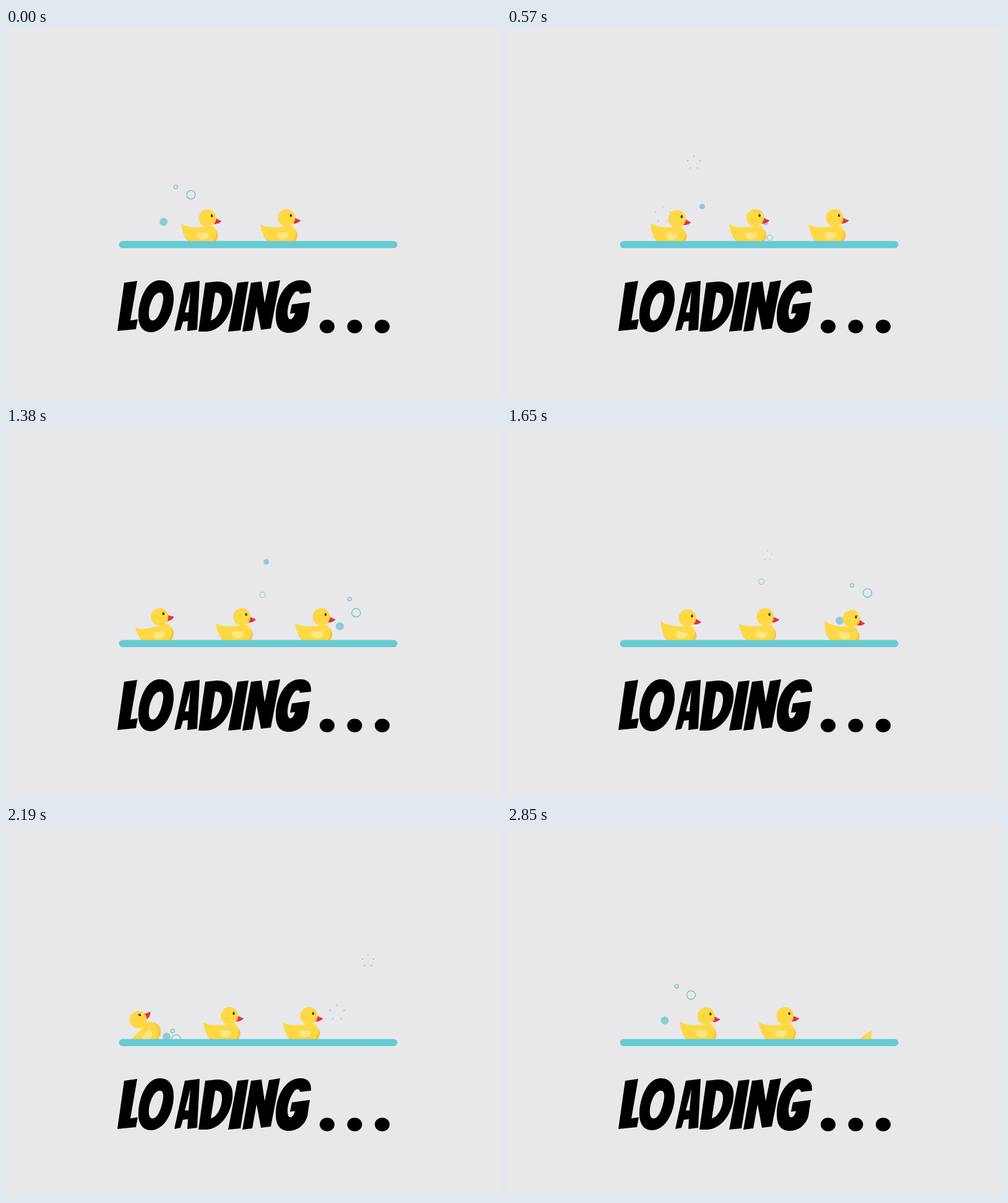
Recreate the animation shown at these times as an HTML page with a canvas. Size 800 by 600 pixels, loop 2.88 s.

```html
<!DOCTYPE html>
<html lang="en">
<head>
<meta charset="utf-8">
<title>Loading...</title>
<style>
html, body { margin: 0; width: 100%; height: 100%; overflow: hidden; background: #e8e8ea; }
canvas { display: block; }
</style>
</head>
<body>
<canvas id="stage" width="800" height="600" role="img" aria-label="Loading..."></canvas>
<script>
const ctx = document.getElementById('stage').getContext('2d');
const LOOP = 2880, STEP = 30, WATER = 345, BURST = 300;
const BACK = '#e8e8ea', BAR = '#66cbd2', RING = '#7cc8cf', SOLID = '#8fccd4', YELLOW = '#ffd842';

const letters = [
  'M191 412L212 409L201 473L213 471L210 487L180 490Z',
  'M247 408C264 407 272 420 271 440C269 468 254 492 234 492C219 492 213 478 214 462C216 434 229 409 247 408Z' +
    'M248 428C256 427 255 440 252 450C249 463 243 474 236 473C230 472 230 461 232 451C235 440 240 429 248 428Z',
  'M289 412L313 409L309 488L293 490L294 474L286 475L282 488L272 490Z M298 426L295 460L289 460Z',
  'M322 412L341 410C361 410 368 422 366 440C363 468 345 491 322 491L311 491Z' +
    'M338 428L331 473C342 470 348 455 349 443C350 432 346 427 338 428Z',
  'M374 412L392 410L379 489L359 491Z',
  'M396 412L413 410L418 445L425 411L443 408L428 486L412 488L405 450L398 489L382 491Z',
  'M474 408C486 407 494 413 493 428L475 430C475 424 468 425 465 430C457 441 453 458 456 468' +
    'C458 474 465 471 467 461L459 462L462 447L491 443L487 470C482 485 470 493 457 493' +
    'C443 493 436 484 436 466C436 436 452 409 474 408Z'
].map(d => new Path2D(d));

// Duck shapes are placed around its turning point.
const body = new Path2D('M-30-16C-24-11-12-10 0-11L21-13C29-6 31 4 26 12C23 17 16 19 5 19C-18 19-29 2-30-16Z');
const shade = new Path2D('M26-7C31-1 31 6 26 12C23 17 16 19 5 19C-11 19-22 11-26 2C-20 11-9 17 5 17C21 17 29 7 26-7Z');
const wing = new Path2D('M-4-1C2-5 8 0 14-3C17 4 12 9 5 9C-1 9-5 4-4-1Z');
const beak = new Path2D('M25-27C28-24 32-23 35-22C32-18 27-16 21-17Z');

// A bubble climbs from (x, from) by (drift, -height), then pops.
const ring = { x: 559, drift: 26, sway: -8, from: 348, height: 130, life: 1150, ease: 1.15, r: 7, line: 1.6, burst: .9 };
const bead = { x: 552, drift: 6, from: 350, height: 99, life: 820, ease: .6, r: 2.9, line: 1.5, burst: .55 };
const ball = { x: 543, drift: -8, from: 345, height: 43, life: 1120, ease: .75, r: 6.5, burst: 1 };
const drop = { x: 308, drift: 14, from: 342, height: 98, life: 1050, ease: 1, r: 4.5, burst: .6, start: 0 };
const bubbles = [
  ...[ring, bead, ball].flatMap(b => [{ ...b, start: 900 }, { ...b, start: 2140, x: b.x - 283 }]),
  drop,
  { ...drop, x: 417, drift: 4, from: 348, height: 140, life: 1080, ease: .77, start: 400 },
  { ...drop, x: 425, drift: -15, height: 99, life: 1200, ease: .95, line: 1.1, burst: .9, start: 540 }
];

function fill(color, path) {
  ctx.fillStyle = color;
  ctx.fill(path);
}

function oval(x, y, rx, ry, color) {
  ctx.beginPath();
  ctx.ellipse(x, y, rx, ry, 0, 0, 7);
  ctx.fillStyle = color;
  ctx.fill();
}

// Surfaces nose first, rocks to rest, swims at a steady pace, then dives.
function duckPose(age) {
  const sunk = 110 * Math.exp(-age / 100);
  const rock = -90 * Math.exp(-((age / 480) ** 2)) * Math.cos(Math.PI * age / 1000);
  const dive = Math.min(1, Math.max(0, (age - 2490) / 330));
  return {
    x: 184.5 + .1338 * age + .3 * sunk + 19 * dive,
    y: 333 + sunk + 31.5 * dive ** 4,
    turn: (rock + 70 * dive ** 2) * Math.PI / 180
  };
}

function drawDuck(age) {
  if (age < STEP) return;
  const { x, y, turn } = duckPose(age);
  ctx.save();
  ctx.translate(x, y);
  ctx.rotate(turn);
  fill(YELLOW, body);
  fill('#f6c53c', shade);
  fill('#e72f42', beak);
  oval(12, -26, 14, 14, YELLOW);
  fill('#ffe583', wing);
  oval(19, -30, 1.7, 2.5, '#2b2420');
  oval(19.5, -31, .6, .7, '#fff');
  ctx.restore();
}

function drawBurst(x, y, p, scale) {
  const r = (4 + 14 * p) * scale, half = 2.8 * (1 - p) * scale;
  ctx.lineWidth = .6 + 2 * (1 - p) * scale;
  ctx.beginPath();
  for (let i = 0; i < 5; i++) {
    const a = i * Math.PI * .4 - Math.PI / 2, c = Math.cos(a), s = Math.sin(a);
    ctx.moveTo(x + c * (r - half), y + s * (r - half));
    ctx.lineTo(x + c * (r + half), y + s * (r + half));
  }
  ctx.stroke();
}

function drawBubble(b, t) {
  const age = (t - b.start + LOOP) % LOOP;
  if (age >= b.life + BURST) return;
  const p = Math.min(1, age / b.life);
  const x = b.x + b.drift * p + (b.sway || 0) * Math.sin(2 * Math.PI * p);
  const y = b.from - b.height * p ** b.ease;
  ctx.strokeStyle = RING;
  if (p === 1) drawBurst(x, y, (age - b.life) / BURST, b.burst);
  else if (b.line) {
    ctx.lineWidth = b.line;
    ctx.beginPath();
    ctx.arc(x, y, b.r, 0, 7);
    ctx.stroke();
  } else oval(x, y, b.r, b.r, SOLID);
}

function draw(t) {
  ctx.fillStyle = BACK;
  ctx.fillRect(0, 0, 800, 600);

  ctx.save();
  ctx.beginPath();
  ctx.rect(0, 0, 800, WATER);
  ctx.clip();
  bubbles.forEach(b => drawBubble(b, t));
  for (let i = 0; i < 3; i++) drawDuck((t + i * LOOP / 3) % LOOP);
  ctx.restore();

  ctx.fillStyle = BAR;
  ctx.beginPath();
  ctx.roundRect(182.5, 344.5, 450, 11.5, 5.75);
  ctx.fill();

  ctx.fillStyle = '#000';
  letters.forEach(p => ctx.fill(p, 'evenodd'));
  for (let i = 0; i < 3; i++) oval(519 + 44.5 * i, 482.8, 12, 11, '#000');
}

const begin = performance.now();
function frame() {
  const t = (performance.now() - begin) % LOOP;
  draw(Math.floor(t / STEP) * STEP);
  requestAnimationFrame(frame);
}
frame();
</script>
</body>
</html>
```
